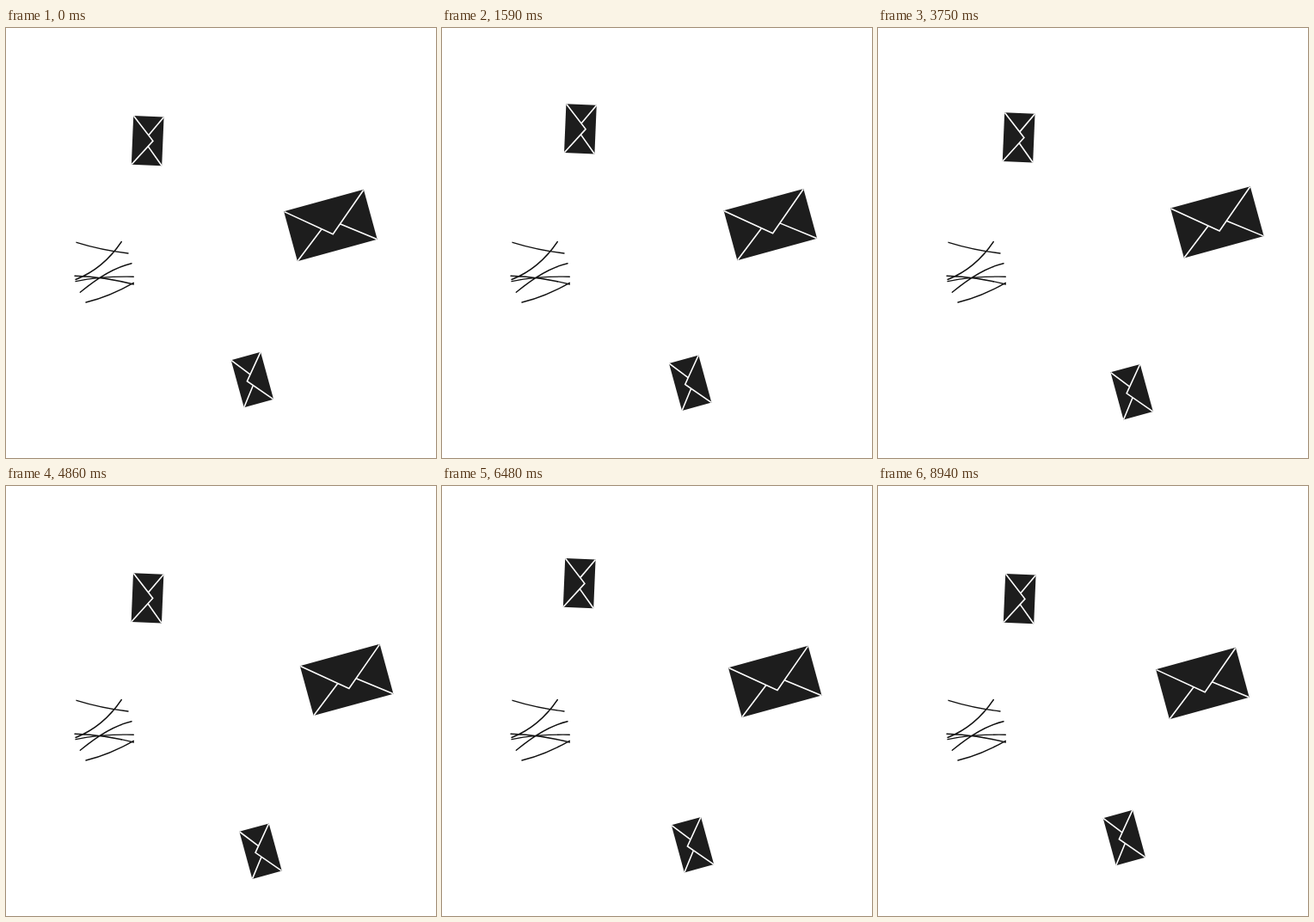
Write an HTML page that moves like this. It is 500 px wide and 500 px high and loops after 9000 ms.

```html
<!DOCTYPE html>
<html lang="en">
<head>
<meta charset="utf-8">
<title>Floating envelopes</title>
<style>
  html, body { margin: 0; width: 100%; height: 100%; overflow: hidden; background: #fff; }
  svg { display: block; width: 100vw; height: 100vh; }
  .scribble { fill: none; stroke: #111; stroke-width: 1.4; stroke-linecap: round; }
  .paper { fill: #1d1d1d; }
  .fold { fill: none; stroke: #fff; stroke-width: 1.6; vector-effect: non-scaling-stroke; }
</style>
</head>
<body>
<svg viewBox="0 0 500 500">
  <defs>
    <g id="envelope">
      <rect class="paper" x="-48.1" y="-30" width="96.2" height="60"/>
      <path class="fold" d="M-47.7 -29.5L0 10.5L47.7 -29.5M-47.7 29.7L-11 1.3M47.7 29.7L11 1.3"/>
    </g>
  </defs>
  <path class="scribble" d="M82 249.3Q110 258 142 262M134.3 248.5Q113 280 81 292.5
    M146 273.7Q119 280 86.3 307.3M80 288.2Q115 289.5 148.3 298
    M81 294.6Q110 288.5 148.3 289.2M148.3 296.3Q121 312 93 319"/>
</svg>
<script>
const LOOP = 9000, HALF = 4500, REST = 60;

const envelopes = [
  { x: 164.7, y: 131.1, angle: -87.6, scale: 0.59, dx: -5.6, dy: -20.2, trips: 2 },
  { x: 377.4, y: 229.5, angle: -15.3, scale: 1, dx: 19.8, dy: -4.3, trips: 1 },
  { x: 286.4, y: 409, angle: 74.7, scale: 0.594, dx: 10.2, dy: 16.6, trips: 1 }
];

const svg = document.querySelector('svg');
for (const item of envelopes) {
  item.node = document.createElementNS(svg.namespaceURI, 'use');
  item.node.setAttribute('href', '#envelope');
  svg.append(item.node);
}

// Soft start at home, brisk turn at the far end.
const ease = u => u * u * (2.3 - 1.3 * u);

// Each half of the loop moves between two short rests.
function distance(time, trips) {
  const move = Math.min(1, Math.max(0, (time % HALF - REST) / (HALF - 2 * REST)));
  if (trips === 2) return ease(1 - Math.abs(2 * move - 1));
  return ease(time < HALF ? move : 1 - move);
}

function draw(time) {
  for (const { node, x, y, angle, scale, dx, dy, trips } of envelopes) {
    const d = distance(time, trips);
    node.setAttribute('transform',
      `translate(${x + dx * d} ${y + dy * d}) rotate(${angle}) scale(${scale})`);
  }
}

const start = performance.now();
function tick() {
  draw((performance.now() - start) % LOOP);
  requestAnimationFrame(tick);
}
tick();
</script>
</body>
</html>
```
